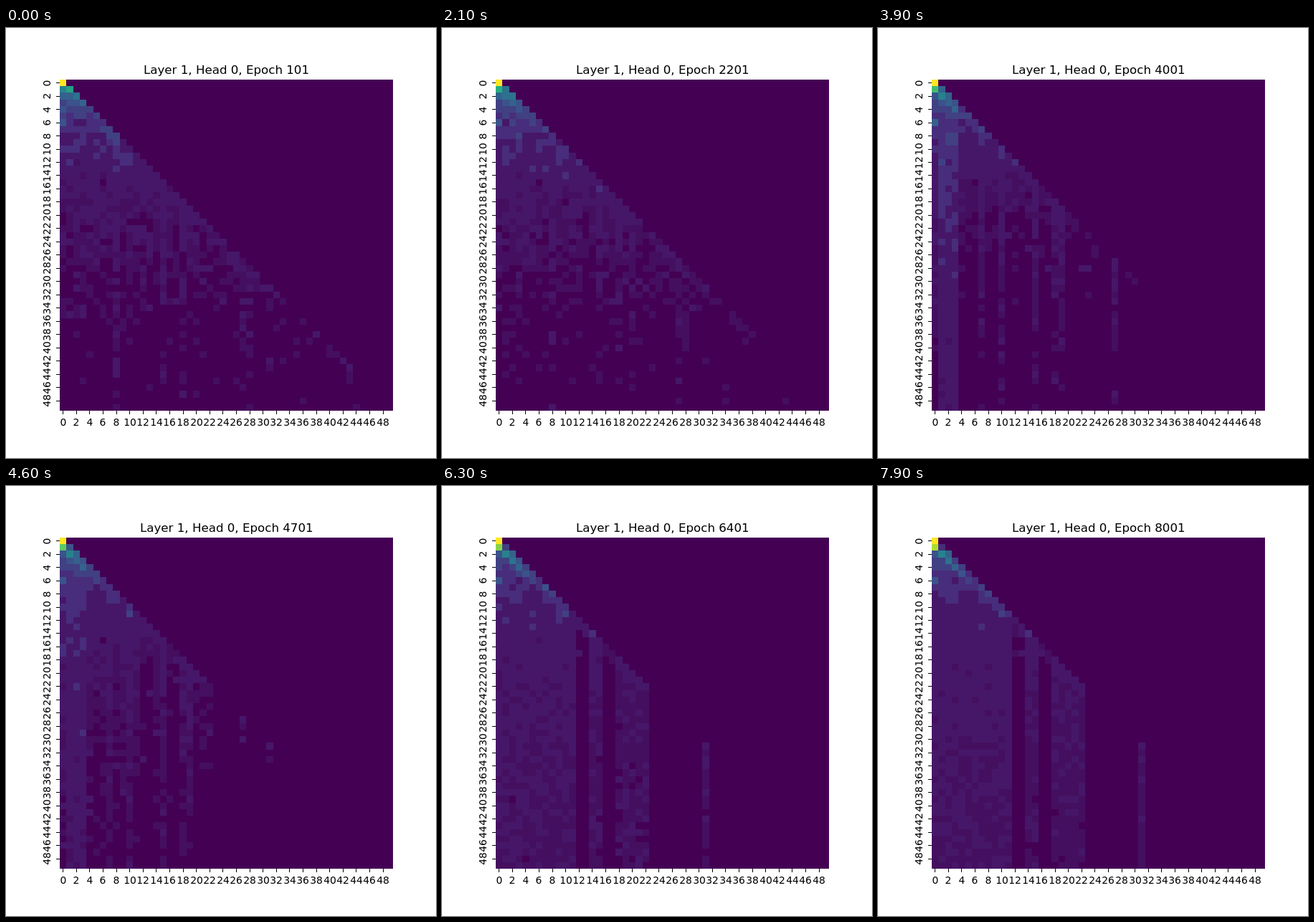
Animation of 600 by 600 pixels, one loop 8000 ms. Source, as an HTML page with a canvas:

```html
<!DOCTYPE html>
<html lang="en">
<head>
<meta charset="utf-8">
<title>Attention heatmap</title>
<style>
  html, body { margin: 0; width: 100%; height: 100%; overflow: hidden; background: #fff; }
  canvas, svg { position: absolute; left: 0; top: 0; width: 600px; height: 600px; }
  text { font-family: "DejaVu Sans", sans-serif; font-size: 13.89px; text-anchor: middle; fill: #000; }
  #title { font-size: 16.67px; text-anchor: start; }
</style>
</head>
<body>
<canvas id="map" width="600" height="600"></canvas>
<svg id="labels" viewBox="0 0 600 600"><text id="title" y="64"></text></svg>
<script>
const N = 50, STEPS = 80, STEP_MS = 100;
const LEFT = 75, TOP = 72, WIDTH = 465, HEIGHT = 462;
const ctx = document.getElementById('map').getContext('2d');
const svg = document.getElementById('labels');
const title = document.getElementById('title');

// Evenly spaced stops of the colour scale.
const SCALE = ['440154', '472d7b', '3b528b', '2c728e', '21918c', '28ae80', '5ec962', 'addc30', 'fde725']
  .map(hex => [0, 2, 4].map(k => parseInt(hex.slice(k, k + 2), 16)));

// Columns that stand out in each stage of training.
const EARLY = [8, 15, 18, 20, 27, 28, 43];
const MIDDLE = [0, 7, 10, 15, 18, 19, 27];
const LATE = [14, 15, 18, 19, 20, 21, 22, 31];
// Row and column pairs with a strong link.
const LINKS = ['14,13', '11,10', '6,0'];

const mix = (a, b, u) => a + (b - a) * u;
const ramp = (t, from, to) => Math.min(1, Math.max(0, (t - from) / (to - from)));
const colX = j => LEFT + WIDTH * j / N;
const rowY = i => TOP + HEIGHT * i / N;

function hash(i, j, k) {
  let h = Math.imul(i + 1, 374761393) ^ Math.imul(j + 1, 668265263) ^ Math.imul(k + 7, 1274126177);
  h = Math.imul(h ^ (h >>> 15), 2246822519);
  h = Math.imul(h ^ (h >>> 13), 3266489917);
  return ((h ^ (h >>> 16)) >>> 0) / 4294967296;
}

// Roughly normal value for a cell.
const bell = (i, j, k) => (hash(i, j, k) + hash(i, j, k + 1000) + hash(i, j, k + 2000) - 1.5) * 2;

// A fixed part per cell plus a part that wanders over time.
function drift(i, j, step) {
  const t = step / 7, k = Math.floor(t);
  return 0.75 * (bell(i, j, -5) + mix(bell(i, j, k), bell(i, j, k + 1), t - k));
}

function columnWeight(j, step) {
  const early = EARLY.includes(j) ? 1.25 : 0.92;
  const middle = j > 0 && j < 4 ? 1.6 : MIDDLE.includes(j) ? 0.88 : 0.6 - 0.004 * j;
  const late = j < 12 ? 0.93 : LATE.includes(j) ? 0.82 : j < 23 ? 0.4 : 0.1;
  return mix(mix(early, middle, ramp(step, 18, 39)), late, ramp(step, 39, 58));
}

function rowValues(i, step, weights) {
  if (i === 0) return [1];
  const age = step / (STEPS - 1);
  if (i === 1) {
    const first = 0.43 + 0.43 * age ** 0.7;
    return [first, 1 - first];
  }
  const sigma = mix(0.25, 0.13, age) * Math.min(1, i / 7);
  const self = i < 7 ? 1.2 : mix(1.25, 1.6, age);
  const previous = i < 7 ? mix(1.1, 2, age) : 1.15;
  const row = [];
  for (let j = 0; j <= i; j++) {
    // Short rows spread more evenly over the columns.
    let w = weights[j] ** Math.min(1, i / 16) * Math.exp(sigma * drift(i, j, step));
    if (j === i) w *= self;
    if (j === i - 1) w *= previous;
    if (LINKS.includes(`${i},${j}`)) w *= 1.9;
    row.push(w);
  }
  const sum = row.reduce((a, b) => a + b);
  return row.map(w => w / sum);
}

// Sixteen levels, with one dim level just above the darkest.
function colour(v) {
  const level = v > 0.032 && v < 0.044 ? 0.04 : Math.round(v * 16) / 16;
  const p = level * (SCALE.length - 1), k = Math.min(SCALE.length - 2, Math.floor(p));
  return `rgb(${SCALE[k].map((c, n) => Math.round(mix(c, SCALE[k + 1][n], p - k)))})`;
}

function draw(step) {
  const weights = Array.from({ length: N }, (_, j) => columnWeight(j, step));
  ctx.fillStyle = colour(0);
  ctx.fillRect(LEFT, TOP, WIDTH, HEIGHT);
  for (let i = 0; i < N; i++) {
    const y = Math.round(rowY(i)), h = Math.round(rowY(i + 1)) - y;
    rowValues(i, step, weights).forEach((v, j) => {
      const x = Math.round(colX(j));
      ctx.fillStyle = colour(v);
      ctx.fillRect(x, y, Math.round(colX(j + 1)) - x, h);
    });
  }
  title.textContent = `Layer 1, Head 0, Epoch ${101 + 100 * step}`;
  title.setAttribute('x', Math.round(LEFT + WIDTH / 2 - title.getComputedTextLength() / 2));
}

function label(n, x, y, turn) {
  const el = document.createElementNS('http://www.w3.org/2000/svg', 'text');
  el.setAttribute('transform', `translate(${x} ${y}) rotate(${turn})`);
  el.textContent = n;
  svg.append(el);
}

function drawAxes() {
  ctx.fillStyle = '#000';
  for (let n = 0; n < N; n += 2) {
    const x = colX(n + 0.5), y = rowY(n + 0.5);
    ctx.fillRect(Math.floor(x), TOP + HEIGHT, 1, 5);
    ctx.fillRect(LEFT - 5, Math.floor(y), 5, 1);
    label(n, Math.round(x), 555, 0);
    label(n, 62, Math.round(y), -90);
  }
}

drawAxes();
const start = performance.now();
let shown = -1;
function tick() {
  const step = Math.floor((performance.now() - start) / STEP_MS) % STEPS;
  if (step !== shown) draw(shown = step);
  requestAnimationFrame(tick);
}
tick();
</script>
</body>
</html>
```
